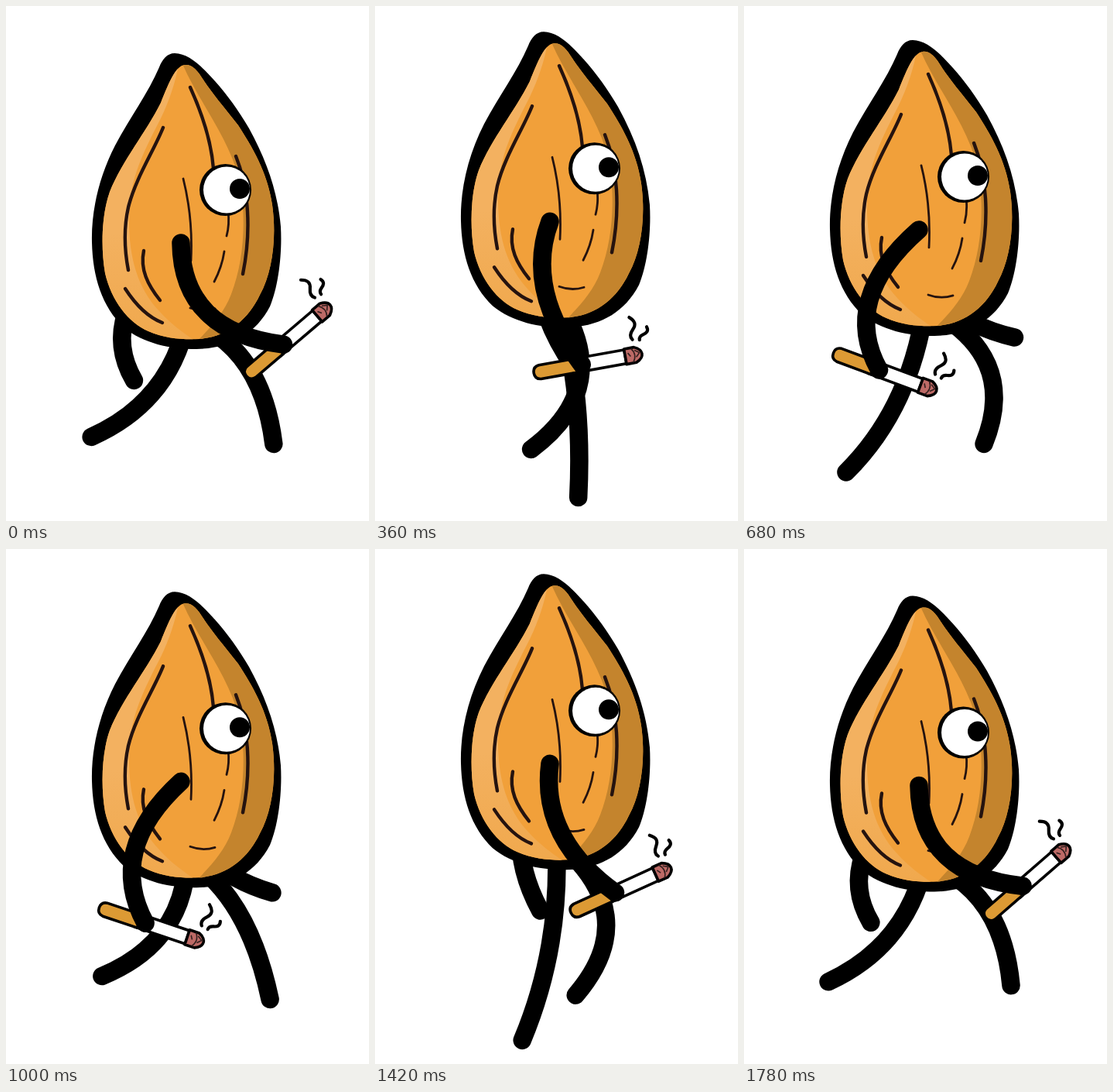
An HTML page for the animation above (1800 ms loop, 469 by 665 pixels).

```html
<!DOCTYPE html>
<html lang="en">
<head>
<meta charset="utf-8">
<title>Strolling almond</title>
<style>
  html, body { margin: 0; width: 100%; height: 100%; overflow: hidden; background: #fff; }
  svg { display: block; width: 469px; height: 665px; }
  .limb { fill: none; stroke: #000; stroke-width: 23.5; stroke-linecap: round; }
  .grain { fill: none; stroke: #25130f; stroke-width: 4.4; stroke-linecap: round; }
  .fine { stroke-width: 2.8; }
  .smoke { fill: none; stroke: #000; stroke-width: 4.2; stroke-linecap: round; }
  .halo { stroke: #fff; stroke-width: 9; }
</style>
</head>
<body>
<svg viewBox="0 0 469 665">
  <defs>
    <path id="kernel" d="M231 76 C219 77 210 100 200 125 C181 163 150 200 134 240 C124 268 122 310 128 345 C136 380 158 409 184 420 C206 430 232 431 250 430 C286 427 313 405 328 373 C344 344 350 300 344 257 C338 215 318 182 300 154 C281 130 266 112 256 97 C247 82 240 75 231 76 Z"/>
    <clipPath id="inside"><use href="#kernel"/></clipPath>
    <linearGradient id="light" x1="0" y1="0" x2="0" y2="1">
      <stop offset=".6" stop-color="#f3b160"/>
      <stop offset="1" stop-color="#f0a84c"/>
    </linearGradient>
  </defs>

  <path id="backArm" class="limb"/>
  <path id="legB" class="limb"/>
  <path id="legA" class="limb"/>

  <g id="body">
    <path d="M218 61 C208 61 202 69 198 79 C184 112 160 144 141 180 C120 221 110 265 111 305 C112 350 124 388 152 415 C178 436 212 443 246 443 C290 442 322 424 341 388 C352 362 357 320 355 285 C351 240 337 200 314 158 C300 134 286 115 270 97 C254 79 236 61 218 61 Z"/>
    <use href="#kernel" fill="#f1a03a"/>
    <g clip-path="url(#inside)">
      <path fill="url(#light)" d="M224 70 C220 95 212 120 200 145 C178 188 160 222 159 270 C158 320 168 362 198 394 C214 412 232 424 248 435 L100 440 L100 70 Z"/>
      <path fill="#c4842d" d="M226 70 C246 120 286 165 302 225 C311 278 307 330 291 372 C281 398 264 415 245 435 L370 440 L370 70 Z"/>
    </g>
    <g class="grain">
      <path d="M203 157 C191 187 167 223 158 260 C152 287 153 315 158 341"/>
      <path d="M238 105 C253 138 265 172 268 210"/>
      <path d="M297 194 C314 236 317 292 306 346"/>
      <path d="M178 316 C173 340 183 360 199 380"/>
      <path d="M154 365 C167 385 184 402 202 409"/>
      <g class="fine">
        <path d="M229 223 C237 255 241 290 239 329"/>
        <path d="M287 265 Q289 282 285 297"/>
        <path d="M282 317 Q279 337 269 356"/>
        <path d="M238 390 Q254 396 270 391"/>
      </g>
    </g>
    <circle cx="283.5" cy="237.5" r="33.5"/>
    <circle cx="285" cy="237.5" r="30" fill="#fff"/>
    <circle cx="302" cy="236" r="13"/>
  </g>

  <g id="cigarette">
    <g stroke="#000" stroke-width="3.6" stroke-linejoin="round">
      <path fill="#fff" d="M-12 -9 H57 V9 H-12 Z"/>
      <path fill="#dc9a34" d="M-8 -9 H-55 Q-63 -8 -63 0 Q-63 8 -55 9 H-8 Z"/>
      <path fill="#bd6a66" d="M57 -10 H70 Q79 -6 79 0 Q79 6 70 10 H57 Z"/>
      <path fill="none" stroke-width="1.6" stroke="#33201f" d="M66 -9 Q73 0 66 9 M70 -6 L76 -2 L71 3 M61 -4 L64 1"/>
    </g>
    <g transform="translate(73 0)">
      <path class="smoke" d="M-2 -49 C5 -43 5 -38 0 -33 S-6 -24 -3 -20"/>
      <path class="smoke halo" d="M18 -33 C20 -27 16 -25 12 -24 S6 -21 6 -18"/>
      <path class="smoke" d="M18 -33 C20 -27 16 -25 12 -24 S6 -21 6 -18"/>
    </g>
  </g>
  <path id="frontArm" class="limb"/>
</svg>

<script>
const LOOP = 1800, STEP = 20, TURN = 2 * Math.PI;
const { sin, cos, abs, PI } = Math;
const rad = degrees => degrees * PI / 180;

const parts = Object.fromEntries(
  ["body", "cigarette", "frontArm", "backArm", "legA", "legB"]
    .map(id => [id, document.getElementById(id)]));

// The body rises once per step, with a quick dip at each footfall
const liftAt = a => -30 * abs(sin(a)) ** 1.55;

// The hands swing a little ahead of the legs
const swingAt = a => cos(a + rad(15));

function armPose(a, lift) {
  const swing = swingAt(a), twice = 2 * swing * swing - 1;
  return {
    mid: [212 + 54 * swing - 5 * twice, 396 + lift],
    end: [262 + 100 * swing, 475 - 24 * swing - 17 * twice + lift]
  };
}

// Knee and foot: sin > 0 carries the weight, sin < 0 swings forward
function legPose(a) {
  const c = cos(a), s = sin(a), twice = cos(2 * a);
  return {
    mid: [257 + 59 * c - 22 * s - 6 * twice, 485.5 - 17 * c + 14 * s - 6.5 * twice],
    end: [
      228 + 118 * cos(a + rad(3)) + 7 * sin(2 * a),
      561 + 35 * s + 47 * s * s + 6 * cos(a + rad(40))
    ]
  };
}

// Quadratic limb that passes through its mid point
function bend(limb, x, y, { mid, end }) {
  const cx = 2 * mid[0] - (x + end[0]) / 2;
  const cy = 2 * mid[1] - (y + end[1]) / 2;
  limb.setAttribute("d", `M${x} ${y} Q${cx} ${cy} ${end[0]} ${end[1]}`);
}

function draw(t) {
  const a = TURN * t / LOOP, opposite = a + PI;
  const lift = liftAt(a), hip = 405 + lift, shoulder = 306 + lift;
  const arm = armPose(a, lift);
  const tilt = -8.5 - 33 * swingAt(a);

  parts.body.setAttribute("transform", `translate(0 ${lift})`);
  bend(parts.legA, 234, hip, legPose(a));
  bend(parts.legB, 234, hip, legPose(opposite));
  bend(parts.frontArm, 226, shoulder, arm);
  bend(parts.backArm, 226, shoulder, armPose(opposite, lift));
  parts.cigarette.setAttribute("transform",
    `translate(${arm.end}) rotate(${tilt})`);
}

const start = performance.now();
function tick() {
  const t = (performance.now() - start) % LOOP;
  draw(Math.floor(t / STEP) * STEP);
  requestAnimationFrame(tick);
}
draw(0);
requestAnimationFrame(tick);
</script>
</body>
</html>
```
